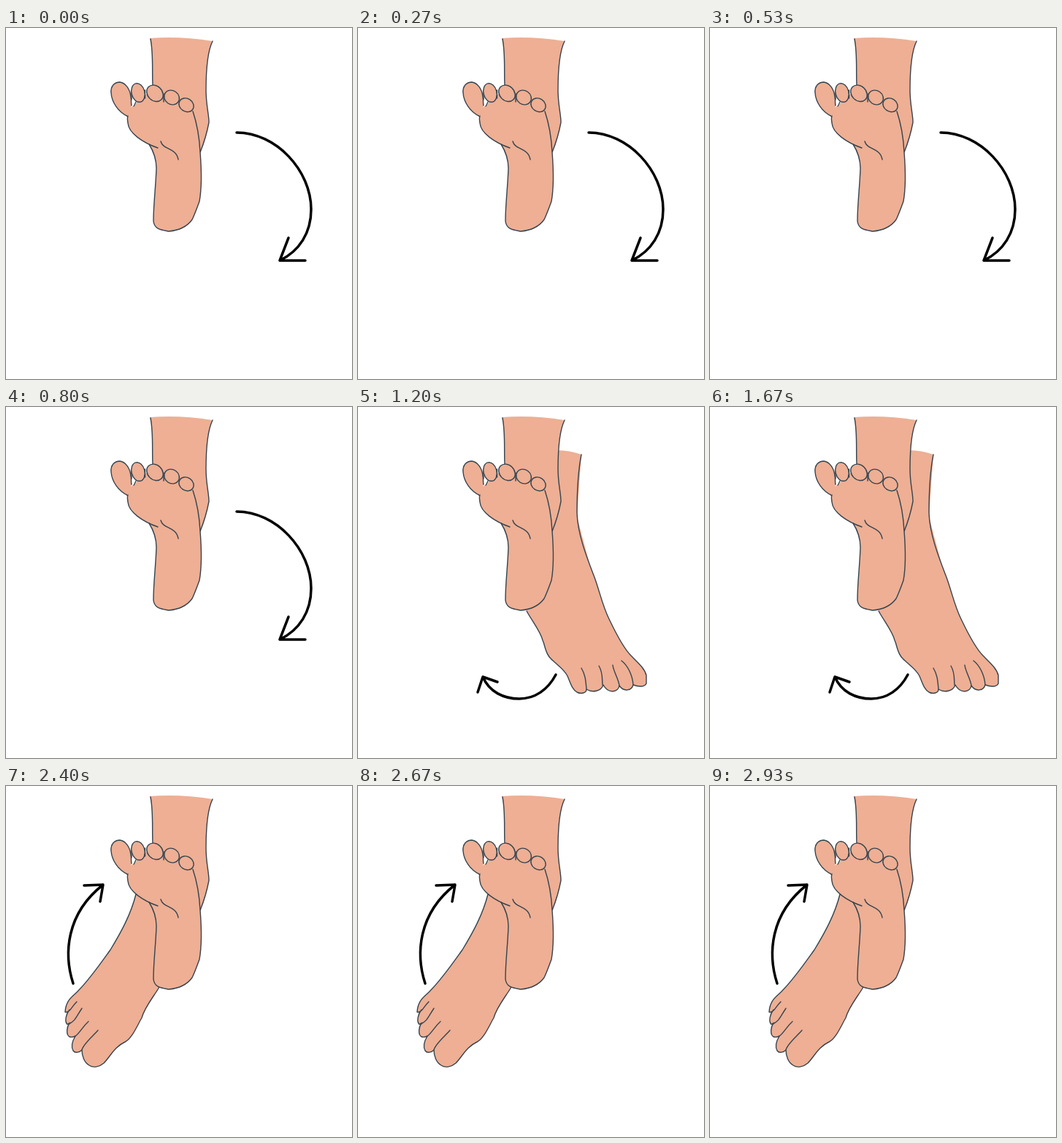
An HTML page that plays this animation: 474x480 px, repeating every 3590 ms.

```html
<!DOCTYPE html>
<html lang="en">
<head>
<meta charset="utf-8">
<title>Ankle rotation</title>
<style>
  html, body { margin: 0; width: 100%; height: 100%; overflow: hidden; background: #fff; }
  svg { display: block; width: 100vw; height: 100vh; }
  path, ellipse { stroke-linecap: round; stroke-linejoin: round; }
  .skin { fill: #eeaf94; }
  .line { fill: none; stroke: #35444e; stroke-width: 1.4; }
  .both { fill: #eeaf94; stroke: #35444e; stroke-width: 1.4; }
  .arrow { fill: none; stroke: #000; stroke-width: 3.5; }
  .pose { visibility: hidden; }
</style>
</head>
<body>
<svg viewBox="0 0 474 480">
  <defs>
    <path id="side" d="M306 65C302 85 300 115 300 145C301 175 314 207 324 233C331 252 335 272 344 290C355 313 366 332 374 340C385 351 393 358 395 367V378C393 383 385 383 377 380C375 388 364 390 358 381C357 390 343 393 336 380C333 389 321 391 313 386C313 391 306 393 300 390C293 386 291 377 287 368C283 359 272 352 264 344C256 336 257 328 253 319C250 307 238 292 231 279"/>
    <path id="sole" d="M196 159C203 170 206 180 206 192C205 220 202 240 202 264C203 275 212 276 223 278C235 277 247 273 255 262C258 256 261 248 265 237C268 220 268 195 266 170C265 150 262 132 256 114"/>
    <path id="toe" d="M167 121C154 115 145 102 144 89C143 79 149 74 156 74C164 75 170 84 171 94C172 98 171 102 172 106"/>
  </defs>

  <g class="pose">
    <path class="arrow" d="M316 143C370 143 418 195 418 248C418 280 402 305 375 318M387 287L375 318H410"/>
  </g>

  <g class="pose">
    <path class="skin" d="M270 59Q290 59 306 65L300 150L320 225L231 279V200Z"/>
    <use href="#side" class="skin"/>
    <use href="#side" class="line"/>
    <path class="line" d="M306 357C312 367 312 376 313 386M330 354C336 364 334 372 335 380M349 353C350 362 357 372 358 381M361 347C369 353 376 366 377 380"/>
    <path class="arrow" d="M271 366C260 387 242 399 221 399C200 399 180 390 171 369M164 390L171 369L191 376"/>
  </g>

  <g class="pose">
    <path class="both" d="M178 148C171 176 157 201 143 224C130 242 115 264 98 281C90 289 82 293 81 309Q85 310 87 306C82 312 80 322 84 326L87 324C83 330 82 340 87 343Q91 344 95 342C92 347 88 355 92 362C95 366 101 364 104 361C104 369 107 378 114 382C120 386 128 384 134 379C143 370 148 357 163 350C173 345 180 327 186 317C190 302 203 287 210 275L215 160Z"/>
    <path class="line" d="M97 295C91 301 90 304 87 307M104 304C96 316 95 321 87 325M113 322C104 330 102 337 95 342M126 334C118 343 105 354 104 361"/>
    <path class="arrow" d="M92 270C79 230 82 175 133 135M107 136L133 135L129 158"/>
  </g>

  <path class="skin" d="M197 14Q240 11 283 18C276 32 274 60 274 85C274 105 278 118 278 129C275 145 270 160 266 170L201 110V78C200 60 202 35 197 14Z"/>
  <path class="line" d="M198 15C202 35 200 60 201 78M283 18C276 32 274 60 274 85C274 105 278 118 278 129C275 145 270 160 266 170"/>

  <use href="#sole" class="skin"/>
  <path class="skin" d="M169 110C166 118 166 125 167 130C168 144 188 157 208 164L266 170C265 150 262 132 256 114L247 104L227 95L204 90L190 91L175 106Z"/>
  <use href="#sole" class="line"/>
  <path class="line" d="M169 110C166 118 166 125 167 130C168 144 188 157 208 164M212 155C215 167 233 163 236 180"/>
  <use href="#toe" class="skin"/>
  <use href="#toe" class="line"/>
  <path class="line" d="M175 107L178 101M172 86V98M190.5 85V96M216 90V101"/>
  <path fill="#fff" d="M173 96L177 101L174 107Z"/>
  <ellipse class="both" rx="9" ry="13" transform="translate(181 88.5)rotate(-14)"/>
  <ellipse class="both" rx="10" ry="12.3" transform="translate(204 89.3)rotate(-45)"/>
  <ellipse class="both" rx="10.8" ry="9.4" transform="translate(227 95)rotate(35)"/>
  <ellipse class="both" rx="10.6" ry="8.8" transform="translate(247 105.3)rotate(33)"/>
</svg>
<script>
  const LOOP = 3590, starts = [0, 1200, 2400];
  const poses = document.querySelectorAll('.pose');
  const begin = performance.now();

  function draw() {
    const t = (performance.now() - begin) % LOOP;
    const current = starts.filter(s => s <= t).length - 1;
    poses.forEach((pose, i) => pose.style.visibility = i === current ? 'visible' : 'hidden');
    requestAnimationFrame(draw);
  }

  draw();
</script>
</body>
</html>
```
